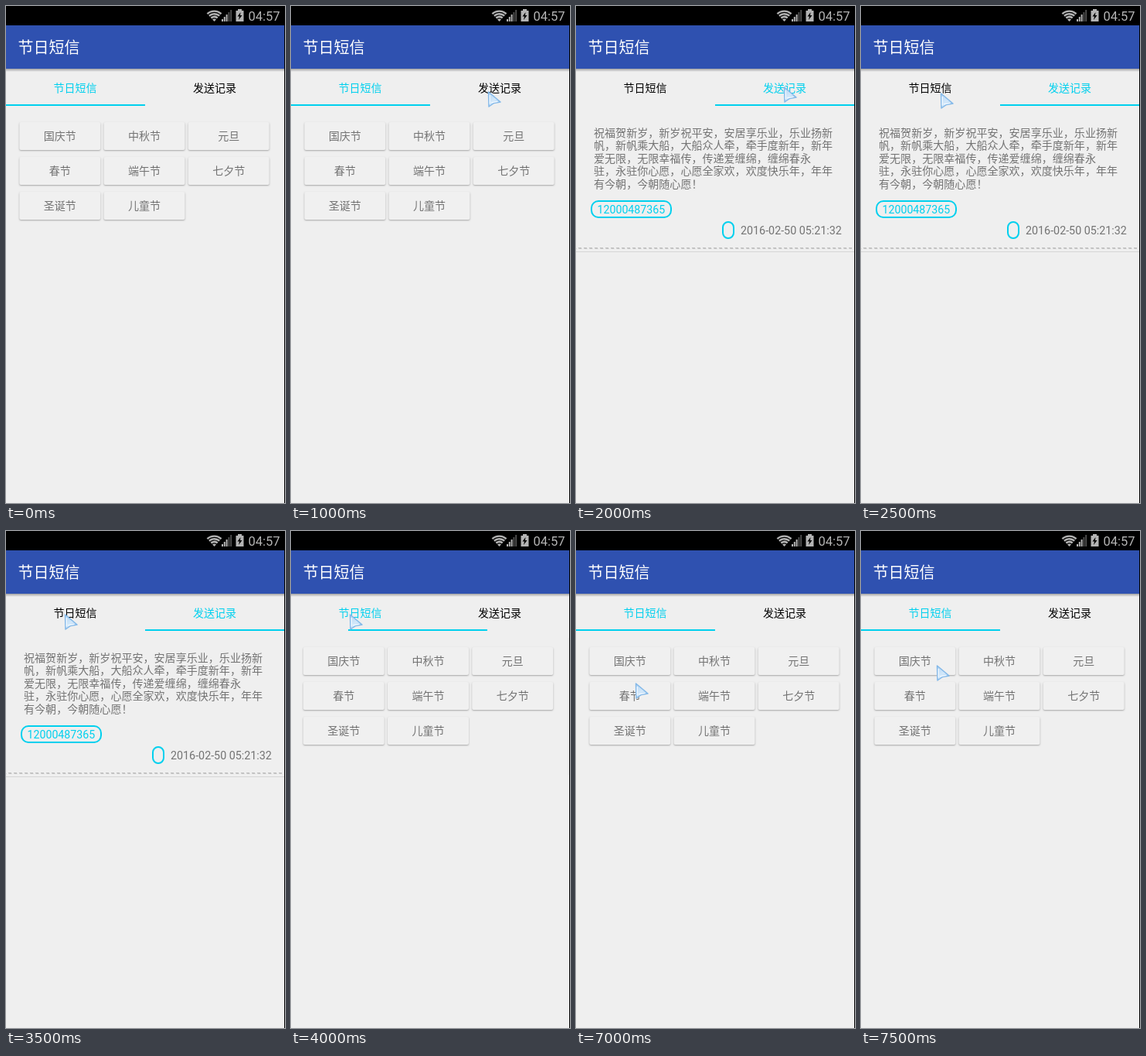
Recreate the animation shown at these times as an HTML page with a canvas. Size 361 by 642 pixels, loop 8000 ms.

```html
<!DOCTYPE html>
<html lang="zh-CN">
<head>
<meta charset="utf-8">
<title>节日短信</title>
<style>
  html, body { margin: 0; width: 100%; height: 100%; overflow: hidden; background: #efefef; }
  canvas { display: block; width: 100vw; height: 100vh; }
</style>
</head>
<body>
<canvas id="stage"></canvas>
<script>
const W = 361, H = 642, LOOP = 8000;
const CYAN = '#00d0ee', BG = '#efefef', GREY = '#737373', ICON = '#b4b4b4';
const FONT = 'Roboto, "Noto Sans CJK SC", "Noto Sans CJK", sans-serif';
const canvas = document.getElementById('stage');
const c = canvas.getContext('2d');

const CARDS = ['国庆节', '中秋节', '元旦', '春节', '端午节', '七夕节', '圣诞节', '儿童节'];
const MESSAGE = [
  '祝福贺新岁，新岁祝平安，安居享乐业，乐业扬新',
  '帆，新帆乘大船，大船众人牵，牵手度新年，新年',
  '爱无限，无限幸福传，传递爱缠绵，缠绵春永',
  '驻，永驻你心愿，心愿全家欢，欢度快乐年，年年',
  '有今朝，今朝随心愿！'
];

// Each step holds until the next one: pointer position plus screen state.
const STEPS = [
  { at: 0 },
  { at: 500, pointer: [75, 230] },
  { at: 1000, pointer: [254, 110] },
  { at: 1500, pointer: [270, 105], pressed: true },
  { at: 2000, pointer: [268, 104], page: 1, bar: 180 },
  { at: 2500, pointer: [102, 112], page: 1, bar: 180 },
  { at: 3000, pointer: [64, 106], page: 1, bar: 180 },
  { at: 3500, pointer: [75, 107], page: 1, bar: 180 },
  { at: 4000, pointer: [75, 107], bar: 74, shift: -1.5 },
  { at: 6500, pointer: [102, 216] },
  { at: 7000, pointer: [76, 196] },
  { at: 7500, pointer: [97, 173] }
];

function rect(x, y, w, h, color) {
  c.fillStyle = color;
  c.fillRect(x, y, w, h);
}

function text(str, x, y, size, color, align = 'left') {
  c.font = `${size}px ${FONT}`;
  c.fillStyle = color;
  c.textAlign = align;
  c.fillText(str, x, y);
}

function poly(points, color) {
  c.beginPath();
  points.forEach(([x, y]) => c.lineTo(x, y));
  c.closePath();
  c.fillStyle = color;
  c.fill();
}

function line(x1, y1, x2, y2, color, width = 1) {
  c.beginPath();
  c.moveTo(x1, y1);
  c.lineTo(x2, y2);
  c.strokeStyle = color;
  c.lineWidth = width;
  c.stroke();
}

function pill(x, y, w, h, r) {
  c.beginPath();
  c.roundRect(x, y, w, h, r);
  c.strokeStyle = CYAN;
  c.lineWidth = 2;
  c.stroke();
}

function wifi() {
  const a = Math.PI / 4.2;
  c.beginPath();
  c.moveTo(269.5, 20);
  c.arc(269.5, 20, 14.5, -Math.PI / 2 - a, -Math.PI / 2 + a);
  c.closePath();
  c.fillStyle = ICON;
  c.fill();
  c.strokeStyle = '#000';
  c.lineWidth = 1.2;
  for (const r of [4.2, 8, 11.6]) {
    c.beginPath();
    c.arc(269.5, 20, r, -Math.PI * 0.8, -Math.PI * 0.2);
    c.stroke();
  }
}

function statusBar() {
  rect(0, 0, W, 25, '#000');
  wifi();
  for (let i = 0; i < 5; i++) {
    const h = 3 + i * 3;
    rect(279 + i * 2.8, 20 - h, 2, h, i < 3 ? ICON : '#4c4c4c');
  }
  rect(300, 4, 5, 2, ICON);
  rect(297.5, 6, 10, 14, ICON);
  poly([[303.5, 8], [299.5, 13.5], [302, 13.5], [301, 18], [305.5, 12], [303, 12]], '#000');
  text('04:57', 313.5, 19, 16.5, ICON);
}

function toolbar() {
  rect(0, 25, W, 56, '#2f51b0');
  text('节日短信', 15.5, 61, 20, '#fff');
  const shade = c.createLinearGradient(0, 81, 0, 85);
  shade.addColorStop(0, 'rgba(0,0,0,.32)');
  shade.addColorStop(1, 'rgba(0,0,0,0)');
  rect(0, 81, W, 4, shade);
}

function tabs(page, bar, pressed) {
  if (pressed) rect(180, 82, 180, 47, '#dedede');
  ['节日短信', '发送记录'].forEach((label, i) =>
    text(label, 89.5 + i * 180.5, 111, 14, i === page ? CYAN : '#000', 'center'));
  rect(bar, 127, 180, 2, CYAN);
}

function card(label, x, y) {
  c.save();
  c.shadowColor = 'rgba(0,0,0,.3)';
  c.shadowBlur = 2 * canvas.width / W;
  c.shadowOffsetY = canvas.height / H;
  c.fillStyle = '#f0f0f0';
  c.beginPath();
  c.roundRect(x, y, 105, 36, 2);
  c.fill();
  c.restore();
  text(label, x + 52.5, y + 22.5, 14, GREY, 'center');
}

function cardPage(shift) {
  CARDS.forEach((label, i) =>
    card(label, 17.3 + (i % 3) * 109.2 + shift, 150 + Math.floor(i / 3) * 45));
  if (shift) line(359, 138, 359, 315, '#e4e4e4');
}

function recordPage() {
  MESSAGE.forEach((row, i) => text(row, 23, 168.5 + i * 16.6, 14.05, GREY));
  pill(20, 252, 103, 21, 9);
  text('12000487365', 27.5, 268, 14.2, CYAN);
  pill(190, 279, 14, 21, 7);
  text('2016-02-50 05:21:32', 213, 295, 14.3, GREY);

  c.setLineDash([4, 3]);
  line(3, 312.5, 357, 312.5, '#bdbdbd');
  c.lineDashOffset = -3.5;
  line(0, 313.5, 357, 313.5, '#c8c8c8');
  c.setLineDash([]);
  c.lineDashOffset = 0;
  line(0, 317.5, 360, 317.5, '#d6d6d6');
}

function pointer([x, y]) {
  c.save();
  c.translate(x, y);
  const fill = c.createLinearGradient(2, 4, 12, 18);
  fill.addColorStop(0, '#bcdaf5');
  fill.addColorStop(0.6, '#d3e8fa');
  fill.addColorStop(1, '#a5cdf2');
  c.lineJoin = 'round';
  poly([[1.5, 1], [17, 14], [8.5, 15.5], [2, 20]], fill);
  c.strokeStyle = '#83b8e8';
  c.lineWidth = 1.5;
  c.stroke();
  line(3.2, 5, 3.2, 16.5, '#f4faff', 1.2);
  line(5, 14.8, 13.5, 13.3, '#f4faff', 1.2);
  c.restore();
}

function draw(time) {
  const { page = 0, bar = 0, shift = 0, pressed, pointer: spot } =
    STEPS.findLast(step => step.at <= time);
  c.setTransform(canvas.width / W, 0, 0, canvas.height / H, 0, 0);
  rect(0, 0, W, H, BG);
  tabs(page, bar, pressed);
  if (page) recordPage();
  else cardPage(shift);
  toolbar();
  statusBar();
  rect(360, 25, 1, H - 25, '#000');
  if (spot) pointer(spot);
}

function resize() {
  const ratio = window.devicePixelRatio || 1;
  canvas.width = Math.round(innerWidth * ratio);
  canvas.height = Math.round(innerHeight * ratio);
}

const start = performance.now();
function tick() {
  draw((performance.now() - start) % LOOP);
  requestAnimationFrame(tick);
}

addEventListener('resize', resize);
resize();
tick();
</script>
</body>
</html>
```
